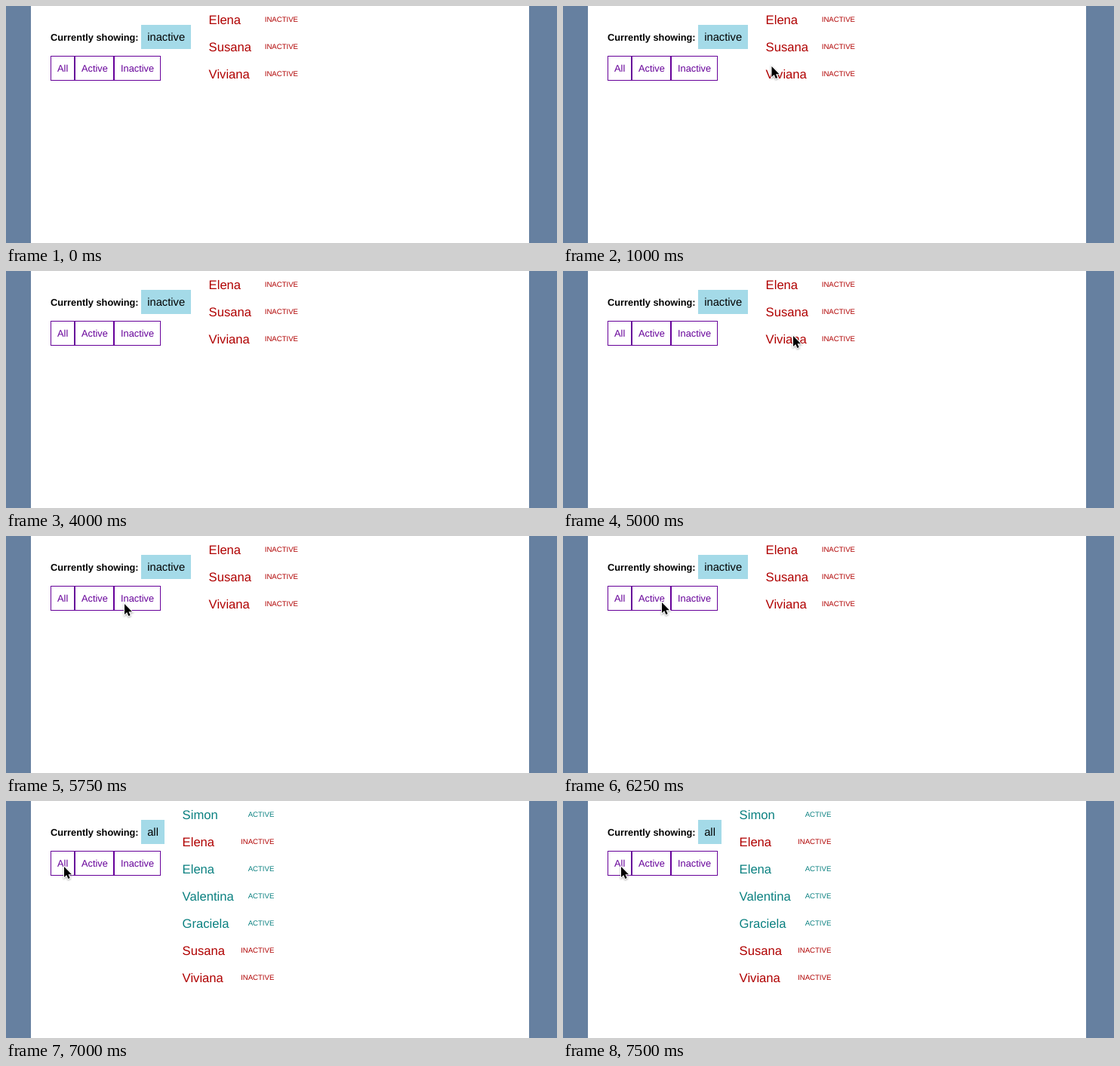
Animation of 730 by 314 pixels, one loop 8 s. Source, as an HTML page:

```html
<!DOCTYPE html>
<html lang="en">
<head>
<meta charset="utf-8">
<title>Filtered list</title>
<style>
  html, body { margin: 0; width: 100%; height: 100%; overflow: hidden; background: #6680a0; }
  svg { display: block; width: 730px; height: 314px; }
  text { font-family: "Liberation Sans", Arial, sans-serif; text-rendering: geometricPrecision; }
  .label { font-size: 12.8px; font-weight: bold; }
  .badge { font-size: 14.72px; }
  .button text { font-size: 12.8px; fill: #609; }
  .button rect { fill: none; stroke: #609; }
  .name { font-size: 16.64px; }
  .status { font-size: 9.6px; text-anchor: end; }
  .active { fill: #0a8080; }
  .inactive { fill: #b00000; }
  #cursor path { stroke: #fff; stroke-width: 2; paint-order: stroke; filter: drop-shadow(0 1px 1px rgba(0, 0, 0, .35)); }
</style>
</head>
<body>
<svg viewBox="0 0 730 314">
  <rect x="33" width="660" height="314" fill="#fff"/>
  <text class="label" x="59" y="46">Currently showing:</text>
  <g id="buttons"></g>
  <g id="views"></g>
  <g id="cursor"><path d="M0 0V14L3.2 11L5.4 16L7.7 15L5.5 10.2H10Z"/></g>
</svg>
<script>
const LOOP = 8000;
const people = [
  ["Simon", "active"], ["Elena", "inactive"], ["Elena", "active"], ["Valentina", "active"],
  ["Graciela", "active"], ["Susana", "inactive"], ["Viviana", "inactive"]
];
// badge width, left edge of names, right edge of statuses
const layouts = {
  all: [31, 233.6, 355.3],
  active: [55, 257.4, 379.3],
  inactive: [66, 268.6, 387]
};
const viewSteps = [[0, "inactive"], [6500, "active"], [7000, "all"]];
// time, pointer tip x, y; no position means hidden
const cursorSteps = [
  [0], [250, 497, 77], [1000, 276.5, 80], [1250, 181, 84], [1500, 124, 90],
  [2000, 127, 90], [4000], [5000, 305, 86], [5250, 189, 110], [5500, 188, 109],
  [5750, 157, 90], [6000, 151, 90], [6250, 131, 88], [6500, 121, 87],
  [6750, 83, 87], [7000, 77, 87]
];

const byId = id => document.getElementById(id);

function add(parent, tag, attrs, text = "") {
  const el = document.createElementNS("http://www.w3.org/2000/svg", tag);
  for (const key in attrs) el.setAttribute(key, attrs[key]);
  el.textContent = text;
  return parent.appendChild(el);
}

function addButton(x, width, text) {
  const g = add(byId("buttons"), "g", { class: "button" });
  add(g, "rect", { x: x + .5, y: 66.5, width: width - 1, height: 32 });
  add(g, "text", { x: x + 9, y: 87 }, text);
}

function addView(filter) {
  const [badge, left, right] = layouts[filter];
  const g = add(byId("views"), "g", {});
  add(g, "rect", { x: 179, y: 25, width: badge, height: 32, fill: "#a4dae8" });
  add(g, "text", { class: "badge", x: 187.2, y: 46 }, filter);
  people.filter(p => filter === "all" || p[1] === filter).forEach(([name, status], i) => {
    const y = 24 + 36 * i;
    add(g, "text", { class: "name " + status, x: left, y }, name);
    add(g, "text", { class: "status " + status, x: right, y: y - 3 }, status.toUpperCase());
  });
  return g;
}

addButton(59, 32, "All");
addButton(91, 52, "Active");
addButton(143, 62, "Inactive");
const views = {};
for (const filter in layouts) views[filter] = addView(filter);

const stepAt = (steps, t) => steps.filter(s => s[0] <= t).pop();

function draw() {
  const t = performance.now() % LOOP;
  const shown = stepAt(viewSteps, t)[1];
  for (const filter in views) views[filter].style.display = filter === shown ? "" : "none";
  const [, x, y] = stepAt(cursorSteps, t);
  const cursor = byId("cursor");
  cursor.style.display = x === undefined ? "none" : "";
  if (x !== undefined) cursor.setAttribute("transform", `translate(${x} ${y})`);
  requestAnimationFrame(draw);
}
draw();
</script>
</body>
</html>
```
